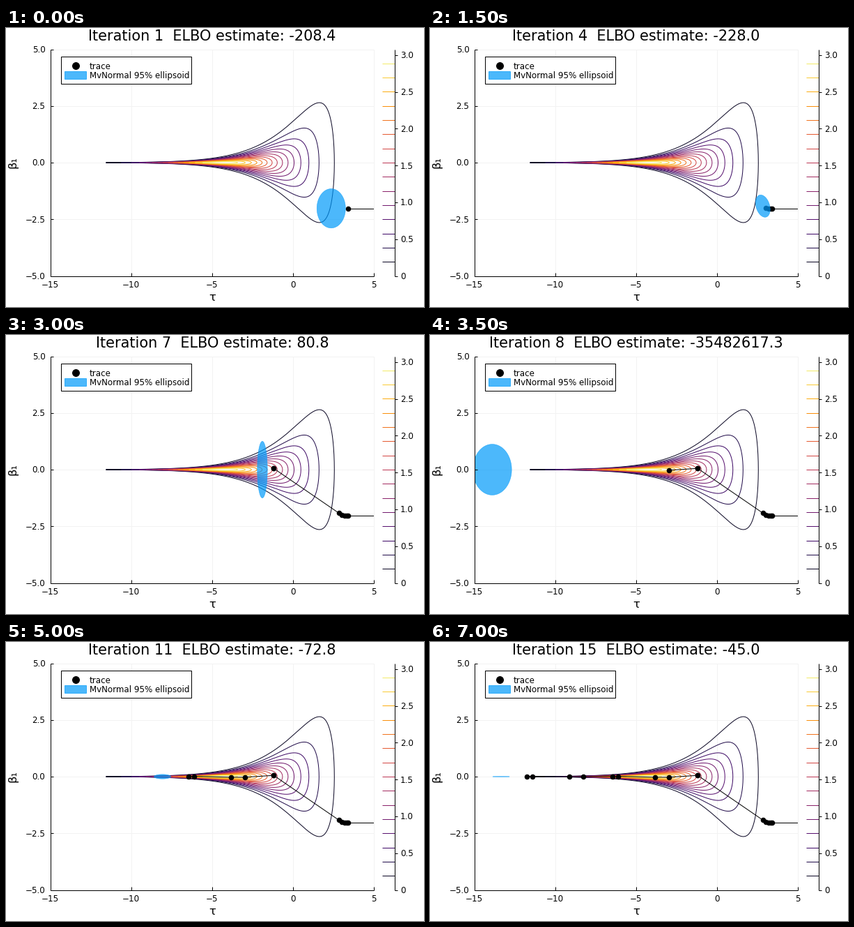
Write a matplotlib script that moves like this. It is 600 by 400 pixels and loops after 7500 ms.

```python
import numpy as np
import matplotlib.pyplot as plt
from matplotlib.animation import FuncAnimation
from matplotlib.patches import Polygon, Rectangle

W, H, DPI = 600, 400, 100
PX = 72 / DPI  # points per pixel
L, R, T, B = 63.8, 527.8, 30.5, 355.5
MID = (L + R) / 2
BAR = 557.8
BLUE = (0, 154 / 255, 250 / 255)
SMALL, LABEL, TITLE = 11.9, 16.4, 20.83
ZMAX = np.exp(1.125)  # peak of the funnel density
CRAWL = 5             # short steps before the jump into the funnel
ELBO = [-208.4, -216.3, -223.7, -228.0, -215.9, -1843.6, 80.8, -35482617.3,
        -636166.1, -2746183905264.8, -72.8, -4827350.6, -315446.2,
        -264930817.5, -45.0]

plt.rcParams["font.family"] = "DejaVu Sans"


def overlay(fig, z):
    """Full-stage axes in pixel units, y pointing down."""
    ax = fig.add_axes([0, 0, 1, 1], zorder=z)
    ax.set(xlim=(0, W), ylim=(H, 0))
    ax.axis("off")
    return ax


def line(ax, xs, ys, color="k", **kw):
    return ax.plot(xs, ys, color=color, lw=PX, solid_capstyle="butt", **kw)[0]


def label(ax, x, y, s, size=SMALL, ha="center", **kw):
    kw.setdefault("va", "baseline")
    return ax.text(x, y, s, fontsize=size * PX, ha=ha, **kw)


def to_x(v):
    return L + (v + 15) / 20 * (R - L)


def to_y(v):
    return B - (v + 5) / 10 * (B - T)


def bar_y(v):
    return B - v / ZMAX * (B - T)


def minus(s):
    return s.replace("-", "\u2212")


def funnel(level):
    """Closed contour of exp(-t²/18 - t/2 - b² exp(-t)/2)."""
    a = np.linspace(0, 2 * np.pi, 800)
    half = np.sqrt(20.25 - 18 * np.log(level))
    t = -4.5 + half * np.cos(a)
    return t, half / 3 * np.sin(a) * np.exp(t / 2)


def ellipse(cx, cy, rx, ry, rho=0):
    a = np.linspace(0, 2 * np.pi, 120)
    return np.c_[cx + rx * np.cos(a), cy + ry * np.cos(a - np.arccos(rho))]


def crawl(j):
    return 3.42 - 0.08 * j - 0.016 * j**2, -2.045 + 0.002 * j**3


def slide(j):
    """Where the j-th pair of funnel steps ends."""
    return -1.19 - 2.64 * j, 0.055 * (-0.5) ** j


def point(i):
    if i < CRAWL:
        return crawl(i)
    j, second = divmod(i - CRAWL, 2)
    x, y = slide(j)
    gap = 0 if second else min(j, 1) * (0.35 + 0.5 * (j % 2))
    return x + gap, y


def shape(i):
    """Ellipse at step i: centre, half sizes, correlation."""
    if i == 0:
        return 2.37, -2.02, 0.885, 0.865
    if i < CRAWL:
        return *crawl(i + 1), 0.45, 0.34 + 0.05 * i, -0.1 * i
    j, second = divmod(i - CRAWL, 2)
    if not second:  # overshoots further with every pair
        return -4.8 - 9.1 * j, 0, 0.33 + 0.87 * j, 1.12
    odd = j % 2
    reach = min(0.7 + 0.5 * j, 1.6)
    return (slide(j)[0] - reach - 6.35 * odd, 0.1 * odd,
            0.15 + 0.23 * reach + 0.6 * odd, 1.25 * 0.28**j)


fig = plt.figure(figsize=(W / DPI, H / DPI), dpi=DPI, facecolor="white")
back = overlay(fig, 0)
ax = fig.add_axes([L / W, 1 - B / H, (R - L) / W, (B - T) / H], zorder=1)
ax.set(xlim=(-15, 5), ylim=(-5, 5))
ax.axis("off")
top = overlay(fig, 2)

# Grid, ticks and axes
for v in range(-15, 6, 5):
    x = to_x(v)
    line(back, [x, x], [T, B], "#f2f2f2")
    line(top, [x, x], [B, B - 4.5])
    label(top, x, 372.3, minus(str(v)))
for v in np.arange(-5, 5.1, 2.5):
    y = to_y(v)
    line(back, [L, R], [y, y], "#f2f2f2")
    line(top, [L, L + 4.5], [y, y])
    label(top, 56.5, y + 4.3, minus(f"{v:.1f}"), ha="right")
line(top, [L, L, R], [T, B, B])
label(top, MID, 391, "τ", LABEL)
label(top, 10.3, 193, "β₁", LABEL, va="center", rotation=90)

# Contours with their colour bar
cmap = plt.get_cmap("inferno")
for k in range(1, 16):
    level, color = ZMAX * k / 16, cmap(k / 16)
    line(ax, *funnel(level), color)
    y = bar_y(level)
    line(top, [BAR - 18, BAR], [y, y], color)
line(top, [BAR, BAR], [T, B])
for v in np.arange(0, 3.1, 0.5):
    y = bar_y(v)
    line(top, [BAR, BAR + 4.5], [y, y])
    label(top, BAR + 8.3, y + 4.3, f"{v:.1f}" if v else "0", ha="left")

# Legend
top.add_patch(Rectangle((78.8, 40.7), 187.5, 39, fc="w", ec="k", lw=PX, zorder=3))
top.plot(99.7, 54, "o", color="k", ms=11 * PX, mew=0, zorder=4)
top.add_patch(Rectangle((83.8, 61.8), 31.5, 11, fc=BLUE, ec=BLUE, lw=PX,
                        alpha=0.7, zorder=4))
label(top, 119.5, 58.7, "trace", ha="left", zorder=4)
label(top, 119.5, 71.7, "MvNormal 95% ellipsoid", ha="left", zorder=4)

# Moving parts; the path starts outside the view
trace = np.array([(12, crawl(0)[1])] + [point(i) for i in range(len(ELBO))])
path = line(ax, [], [], marker="o", ms=7.6 * PX, mew=0, zorder=5)
blob = Polygon(ellipse(*shape(0)), fc=BLUE, ec=BLUE, lw=0.6 * PX,
               alpha=0.7, zorder=6)
ax.add_patch(blob)
title = label(top, MID, 18, "", TITLE)


def update(i):
    path.set_data(*trace[:i + 2].T)
    blob.set_xy(ellipse(*shape(i)))
    title.set_text(f"Iteration {i + 1}  ELBO estimate: {ELBO[i]:.1f}")
    return path, blob, title


anim = FuncAnimation(fig, update, frames=len(ELBO), init_func=lambda: update(0),
                     interval=500, repeat=True, repeat_delay=0)
plt.show()
```
